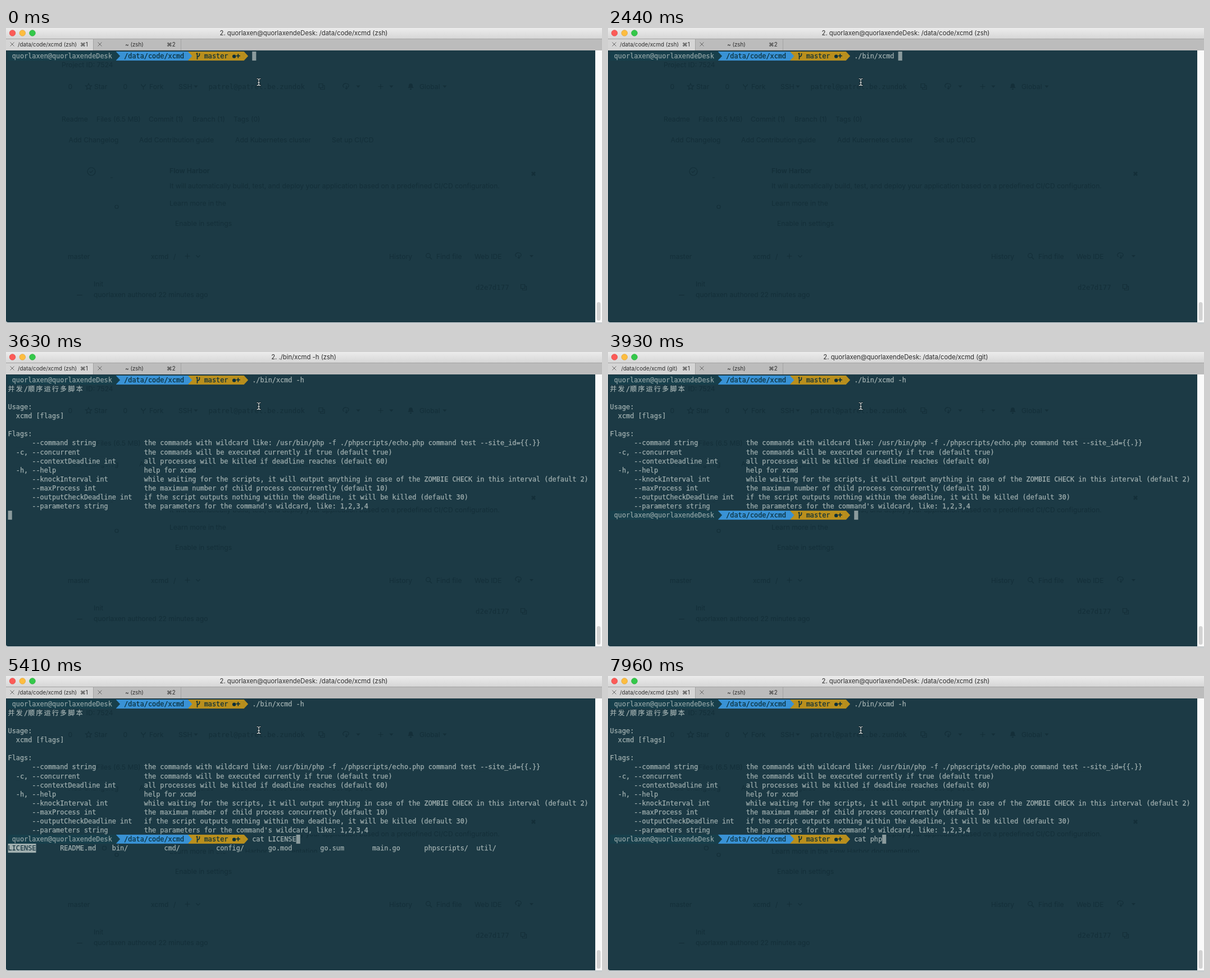
Write an HTML page that moves like this. It is 1061 px wide and 528 px high and loops after 8000 ms.

```html
<!DOCTYPE html>
<html lang="en">
<head>
<meta charset="utf-8">
<title>xcmd in a terminal</title>
<style>
html, body { margin: 0; width: 100%; height: 100%; overflow: hidden; background: #1c3a45; }
svg { display: block; width: 100%; height: 100%; }
text { white-space: pre; }
.ui { font-family: Inter, Roboto, sans-serif; fill: #2c2c2c; }
.mono { font: 11.84px 'DejaVu Sans Mono', 'Noto Sans CJK SC', 'Noto Sans CJK', monospace; }
.ghost { font: 12.15px Inter, Roboto, sans-serif; fill: #142f39; }
.ghost .code { font: 12.4px 'DejaVu Sans Mono', monospace; }
.ghost .line { fill: none; stroke: #142f39; stroke-width: 1.2; }
</style>
</head>
<body>
<svg viewBox="0 0 1061 528">
  <defs>
    <linearGradient id="bar" x2="0" y2="1"><stop stop-color="#ececec"/><stop offset="1" stop-color="#d5d5d5"/></linearGradient>
  </defs>
  <rect width="1061" height="528" fill="#c9cdcf"/>
  <path d="M0 40H1049V525H4Q0 525 0 521Z" fill="#1c3a45"/>
  <rect x="1049" y="40" width="12" height="485" fill="#fafafa"/>
  <rect x="1051.5" y="489" width="7" height="33" rx="3.5" fill="#d2d2d2"/>
  <g id="page" class="ghost"></g>
  <g id="term" class="mono"></g>
  <g fill="none" stroke-linecap="round">
    <path id="beam" d="M447 90.5q3 0 3 2v8q0 2-3 2M453 90.5q-3 0-3 2M453 102.500q-3 0-3-2M448.500 97.500h3" stroke="#0d1c22" stroke-width="2.6"/>
    <path d="M447 90.5q3 0 3 2v8q0 2-3 2M453 90.5q-3 0-3 2M453 102.500q-3 0-3-2M448.500 97.500h3" stroke="#e4eaea" stroke-width="1.1"/>
  </g>
  <rect width="1061" height="20" fill="url(#bar)"/>
  <rect y="19" width="1061" height="21" fill="#bcbcbc"/>
  <rect y="20" width="155" height="20" fill="#d5d5d5"/>
  <path d="M0 19.5H1061M155.500 20V40M311.500 20V40" stroke="#a3a3a3"/>
  <g stroke-width=".7">
    <circle cx="11.500" cy="9" r="5.300" fill="#fc5b57" stroke="#df4744"/>
    <circle cx="29.300" cy="9" r="5.300" fill="#fdbd40" stroke="#de9f34"/>
    <circle cx="47" cy="9" r="5.300" fill="#34c84a" stroke="#27a935"/>
  </g>
  <path d="M7.500 25.500l7 7m0-7l-7 7M163.500 25.500l7 7m0-7l-7 7" stroke="#666" stroke-width="1"/>
  <g class="ui" font-size="9.75">
    <text id="title" x="530" y="13" font-size="11.3" text-anchor="middle"></text>
    <text id="tab" x="73.500" y="32.700" text-anchor="middle"></text>
    <text x="228.500" y="32.700" text-anchor="middle">~ (zsh)</text>
    <g font-family="Inter, 'DejaVu Sans', sans-serif"><text x="132" y="32.700">⌘1</text><text x="286" y="32.700">⌘2</text></g>
  </g>
</svg>
<script>
const LOOP = 8000, CELL = 7.125, ROW = 16.07, LEFT = 3.6, TOP = 42;
const BG = '#1c3a45', FG = '#a2b1b1', CURSOR = '#8b9b9d';
const NAVY = '#173f4b', BLUE = '#3992d5', GOLD = '#b98f1d', INK = '#0c303b';
const USER = 'quorlaxen', HOST = USER + 'deDesk', DIR = '/data/code/xcmd';
const $ = id => document.getElementById(id);
const colX = c => LEFT + c * CELL;
const rowY = r => TOP + r * ROW;
const rect = (x, y, w, h, fill) => `<rect x="${x}" y="${y}" width="${w}" height="${h}" fill="${fill}"/>`;
const esc = s => s.replace(/&/g, '&amp;').replace(/</g, '&lt;');

// Terminal cells
const block = (c, r, n, fill) => rect(colX(c), rowY(r), n * CELL, 16.1, fill);

function glyphs(c, r, str, fill = FG, bold = false) {
  const xs = [];
  for (const ch of str) {
    xs.push(colX(c).toFixed(2));
    c += ch > '\u2fff' ? 2 : 1;
  }
  return `<text x="${xs.join(' ')}" y="${(rowY(r) + 12).toFixed(2)}" fill="${fill}" stroke="${fill}" stroke-width="${bold ? .8 : .25}">${esc(str)}</text>`;
}

const cells = (c, r, str) => {
  const wide = [...str].filter(ch => ch > '\u2fff').length;
  return block(c, r, str.length + wide, BG) + glyphs(c, r, str);
};

// One row; runs parted by two or more spaces get their own background
const line = (r, str) => [...str.matchAll(/\S+(?: \S+)*/g)].map(m => cells(m.index, r, m[0])).join('');

const arrow = (c, r, fill) =>
  `<path d="M${colX(c) - .3} ${rowY(r)}l${CELL + .3} 8.05l${-CELL - .3} 8.05z" fill="${fill}"/>`;

function prompt(r) {
  const x = colX(47), y = rowY(r);
  return block(0, r, 27, NAVY) + block(27, r, 18, BLUE) + block(45, r, 14, GOLD) + block(59, r, 2, BG) +
    arrow(27, r, NAVY) + arrow(45, r, BLUE) + arrow(59, r, GOLD) +
    glyphs(1, r, `${USER}@${HOST}`, '#93a5a6') + glyphs(29, r, DIR, INK) + glyphs(49, r, 'master', INK) +
    `<path d="M${x + 2} ${y + 2.5}v11.500M${x + 6} ${y + 3}v3q0 2-4 4M${x + .3} ${y + 4.5}l1.700-2" fill="none" stroke="${INK}" stroke-width="1.6"/>` +
    `<circle cx="${colX(56.5)}" cy="${y + 8.6}" r="3.2" fill="${INK}"/>` + glyphs(57, r, '+', INK, true);
}

const FLAGS = [
  ['    --command string', 'the commands with wildcard like: /usr/bin/php -f ./phpscripts/echo.php command test --site_id={{.}}'],
  ['-c, --concurrent', 'the commands will be executed currently if true (default true)'],
  ['    --contextDeadline int', 'all processes will be killed if deadline reaches (default 60)'],
  ['-h, --help', 'help for xcmd'],
  ['    --knockInterval int', 'while waiting for the scripts, it will output anything in case of the ZOMBIE CHECK in this interval (default 2)'],
  ['    --maxProcess int', 'the maximum number of child process concurrently (default 10)'],
  ['    --outputCheckDeadline int', 'if the script outputs nothing within the deadline, it will be killed (default 30)'],
  ['    --parameters string', "the parameters for the command's wildcard, like: 1,2,3,4"],
];
const HELP = ['并发/顺序运行多脚本', '', 'Usage:', '  xcmd [flags]', '', 'Flags:',
  ...FLAGS.map(([flag, note]) => ('  ' + flag).padEnd(34) + note)].map((s, i) => line(i + 1, s)).join('');
const FILES = ['LICENSE', 'README.md', 'bin/', 'cmd/', 'config/', 'go.mod', 'go.sum', 'main.go', 'phpscripts/', 'util/'];

// Timeline: [from ms, value]
const FIRST = [[0, ''], [500, '.'], [650, './'], [950, './bi'], [1690, './bin'], [1840, './bin/'],
  [2440, './bin/xcmd '], [3340, './bin/xcmd -'], [3490, './bin/xcmd -h']];
const SECOND = [[0, ''], [4680, 'c'], [4820, 'ca'], [4970, 'cat'], [5110, 'cat '], [5410, 'cat LICENSE'],
  [6760, 'cat LICENS'], [6910, 'cat LICEN'], [7060, 'cat LICE'], [7210, 'cat LIC'], [7360, 'cat L'],
  [7510, 'cat '], [7810, 'cat p'], [7960, 'cat php']];
const shell = job => `${USER}@${HOST}: ${DIR} (${job})`;
const TITLE = [[0, shell('zsh')], [3630, './bin/xcmd -h (zsh)'], [3780, shell('zsh')], [3930, shell('git')], [4530, shell('zsh')]];
const at = (list, t) => list.findLast(([from]) => t >= from)[1];

function fileList(chosen) {
  return FILES.map((f, i) => cells(i * 13, 16, f)).join('') +
    (chosen ? block(0, 16, 7, FG) + glyphs(0, 16, FILES[0], BG) : '');
}

function terminal(t) {
  const cmd = at(FIRST, t), next = at(SECOND, t);
  let out = prompt(0) + (cmd && cells(61, 0, cmd));
  if (t >= 1840 && t < 2440) out += glyphs(66, 0, '/', FG, true);
  if (t < 3630) return out + block(61 + cmd.length, 0, 1, CURSOR);
  out += HELP;
  if (t < 3930) return out + block(0, 15, 1, CURSOR);
  out += prompt(15) + (next && cells(61, 15, next)) + block(61 + next.length, 15, 1, CURSOR);
  return t >= 5260 && t < 6610 ? out + fileList(t >= 5410) : out;
}

// Web page shining through the window
function page() {
  const say = (x, y, s, extra = '') => `<text x="${x}" y="${y}" ${extra}>${s}</text>`;
  const words = (y, ...items) => items.map(([x, s]) => say(x, y, s)).join('');
  const stroke = d => `<path class="line" d="${d}"/>`;
  const carets = (y, ...xs) => xs.map(x => `<path d="M${x - 3.5} ${y - 2}h7l-3.500 4z"/>`).join('');
  const ring = (x, y, r) => `<circle class="line" cx="${x}" cy="${y}" r="${r}"/>`;
  const copy = (x, y) => stroke(`M${x - 5} ${y - 5}h7v7h-7zM${x + 2} ${y - 2}h3v7h-7v-3`);
  const cloud = (x, y) => stroke(`M${x - 3} ${y + 2}q-3-1-2-4q2-4 6-3q5 1 4 5l-2 2M${x + 1} ${y - 1}v6m-2-2l2 2l2-2`);
  const plus = (x, y) => stroke(`M${x - 4.5} ${y}h9m-4.500-4.500v9`);
  return words(70, [99, 'Project ID: 7524']) +
    words(108.5, [110.5, '0'], [157, 'Star'], [208.5, '0'], [255, 'Fork'], [307, 'SSH'], [736, 'Global']) +
    say(360.5, 108.5, 'patrel@patrel.be.zundok', 'class="code"') +
    stroke('M147 99l1.500 3.500l4 .5l-3 2.500l1 4l-3.500-2l-3.500 2l1-4l-3-2.500l4-.500z') +
    stroke('M241 100v2l3.500 3l3.500-3v-2M244.500 105v5') +
    carets(104.5, 338, 627, 686, 781) + copy(562, 104.5) + cloud(605, 104) + plus(667, 104.5) +
    '<path d="M715 107q2-1 2-4q0-4 3.500-4t3.500 4q0 3 2 4zM719 108h3v2h-3z"/>' +
    words(167.3, [99, 'Readme'], [161, 'Files (6.5 MB)'], [254, 'Commit (1)'], [332, 'Branch (1)'], [405, 'Tags (0)']) +
    words(204, [111.5, 'Add Changelog'], [237, 'Add Contribution guide'], [408, 'Add Kubernetes cluster'], [580, 'Set up CI/CD']) +
    ring(152, 256, 7) + stroke('M149 256l2 2l4-4M186 267h4') + ring(197, 319, 3) +
    say(291, 259.3, 'Flow Harbor', 'font-weight="600"') +
    '<path d="M936 257l6 6m0-6l-6 6" stroke="#142f39" stroke-width="2.5"/>' +
    words(285.5, [291, 'It will automatically build, test, and deploy your application based on a predefined CI/CD configuration.']) +
    words(316.5, [291, 'Learn more in the']) +
    `<g id="fresh">${ring(175, 307, 3.5)}${say(395, 316.5, 'Flow Harbor documentation')}${rect(394, 315, 170, 6, BG)}</g>` +
    words(353, [301, 'Enable in settings']) +
    words(411.5, [110, 'master'], [258, 'xcmd'], [298, '/'], [682, 'History'], [766, 'Find file'], [834, 'Web IDE']) +
    plus(323, 407) + stroke('M338.500 405.500l3.500 3.500l3.500-3.500') + ring(751.5, 406, 3.8) + stroke('M754.500 409l3.500 3.500') +
    cloud(912, 406) + carets(407, 935.5) +
    words(461, [156, 'Init']) + words(480, [156, USER + ' authored 22 minutes ago']) + stroke('M126 476.500h10') +
    say(836, 466.5, 'd2e7d177', 'class="code"') + copy(921.5, 462.5);
}

let shown;
function draw(t) {
  const html = terminal(t), title = at(TITLE, t);
  if (shown !== html + title) {
    shown = html + title;
    $('term').innerHTML = html;
    $('title').textContent = '2. ' + title;
    $('tab').textContent = `${DIR} (${title.includes('(git)') ? 'git' : 'zsh'})`;
  }
  $('fresh').setAttribute('visibility', t >= 5260 ? 'visible' : 'hidden');
}

$('page').innerHTML = page();
function tick() {
  draw(performance.now() % LOOP);
  requestAnimationFrame(tick);
}
tick();
</script>
</body>
</html>
```
